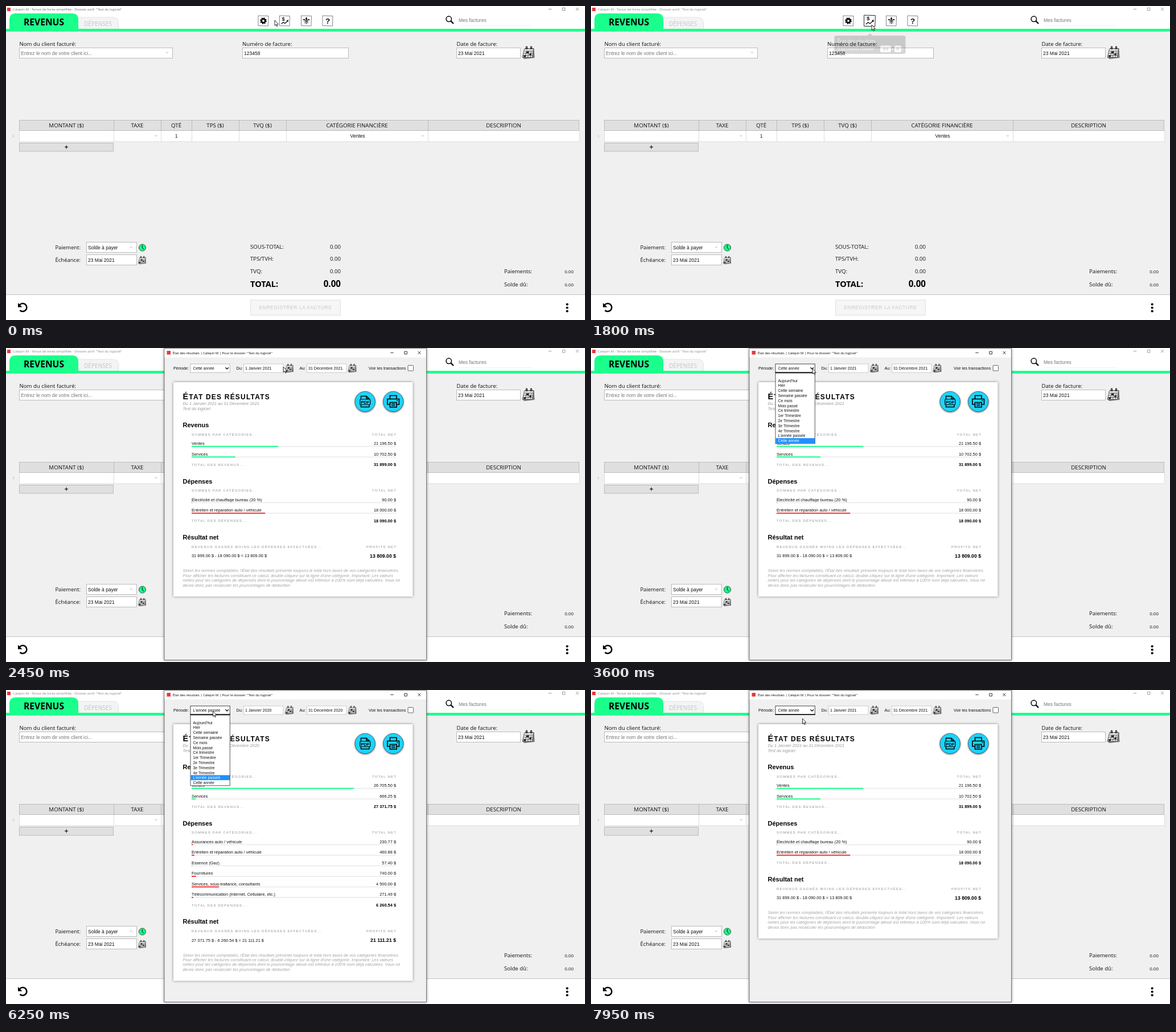
Recreate the animation shown at these times as an HTML page. Size 1017 px wide and 551 px high, loop 8 s.

```html
<!DOCTYPE html>
<html lang="fr">
<head>
<meta charset="utf-8">
<title>État des résultats</title>
<style>
html, body { margin: 0; width: 100%; height: 100%; overflow: hidden; background: #fff; }
svg { display: block; width: 100vw; height: 100vh; font-family: "Liberation Sans", Arial, sans-serif; }
text { white-space: pre; }
.o { font-family: "Open Sans", "Noto Sans", sans-serif; }
.b { font-weight: bold; }
.i { font-style: italic; }
.m { text-anchor: middle; }
.e { text-anchor: end; }
.sp { letter-spacing: 1.23px; }
.line { fill: none; stroke: #000; }
.card { filter: drop-shadow(0 0 2px #0007); }
.round { filter: drop-shadow(0 1px 1.5px #0009); }
</style>
</head>
<body>
<svg viewBox="0 0 1017 551" preserveAspectRatio="none">
  <g id="main"></g><g id="icon"></g><g id="tip"></g><g id="win"></g><g id="cursor"></g>
</svg>
<script>
const LOOP = 8000, GREEN = '#1aff8c', CYAN = '#1cd4fa', LABEL = '#8c8c8c', APP = 'Calepin M';

const rect = (x, y, w, h, fill, stroke = 'none', more = '') =>
  `<rect x="${x}" y="${y}" width="${w}" height="${h}" fill="${fill}" stroke="${stroke}" ${more}/>`;
// y is the middle of the capitals
const text = (s, x, y, size, cls = '', fill = '#111', more = '') =>
  `<text x="${x}" y="${y + size * .355}" font-size="${size}" class="${cls}" fill="${fill}" ${more}>${s}</text>`;
const path = (d, width = 1, more = '') => `<path class="line" d="${d}" stroke-width="${width}" ${more}/>`;
const solid = (d, fill = '#000') => `<path d="${d}" fill="${fill}"/>`;
const circle = (x, y, r, fill = '#000', more = '') => `<circle cx="${x}" cy="${y}" r="${r}" fill="${fill}" ${more}/>`;
const at = (x, y, scale, s) => `<g transform="translate(${x} ${y}) scale(${scale})">${s}</g>`;
const field = (x, y, w, s, fill = '#111') =>
  rect(x + .5, y + .5, w - 1, 18, '#fff', '#bbb') + text(s, x + 3, y + 9.6, 8.5, '', fill);
const caret = (x, y) => solid(`M${x - 3} ${y - 1.5}h6l-3 3.5z`, '#dedede');

const calendar = (x, y, scale) => at(x, y, scale,
  solid('M-6 -8H10L11 9L-7 11L-11 8Z', '#777') +
  solid('M-7 -7H9L7 8H-10Z', '#eee') +
  path('M-7 -7H9L7 8H-10ZM-7.5 -3H8.5M-8.5 1H8M-9 4.5H7.5M-3.5 -3L-5.5 8M.8 -3L-1 8M5 -3L3.5 8', .8, 'style="stroke:#444"') +
  solid('M-3 -2.5h4l-.5 3.5h-4zM2 1.5h3.5l-.5 3h-3.5zM-8 4.5h4l-.5 3h-4z', '#222') +
  path('M-4 -6v-4q1 -2 2 0v4M4 -6v-4q1 -2 2 0v4', 1.1));

const controls = (x, y, gap, color) =>
  path(`M${x - 2.7} ${y}h5.4M${x + gap - 2.2} ${y - 2.2}h4.6v4.6h-4.6zM${x + 2 * gap - 2.5} ${y - 2.5}l5 5m0 -5l-5 5`, .8, `style="stroke:${color}"`);

const toolIcon = (x, scale, glyph, border = '#777') => at(x, 26, scale,
  solid('M-9 -9L9 -8.5L8.5 9L-9 8.5Z', '#fff') +
  path('M-9 -9L9 -8.5L8.5 9L-9 8.5Z', .9, `style="stroke:${border}"`) + glyph);

const gear = circle(0, 0, 3.3, 'none', 'stroke="#000" stroke-width="2.7"') +
  circle(0, 0, 5, 'none', 'stroke="#000" stroke-width="1.8" stroke-dasharray="1.963"');
const trend = text('$', -2.5, -3.5, 8.5, 'b m') + path('M-6 5.5L-2.5 2.5L.5 4.5L5.5 0', 1.1) + solid('M6.7 -1.5L3.2 -1L6 2Z');
const lily = `<text class="m" y="6.3" font-size="17.5" font-family="DejaVu Sans, sans-serif">⚜</text>`;

function mainView(active) {
  const tone = active ? '#707070' : '#868686';
  const cols = [23, 189, 272, 326, 409, 492, 741, 1007];
  const heads = ['MONTANT ($)', 'TAXE', 'QTÉ', 'TPS ($)', 'TVQ ($)', 'CATÉGORIE FINANCIÈRE', 'DESCRIPTION'];
  let s = rect(0, 0, 1017, 551, '#fff') + rect(0, 40, 1017, 466, '#f0f0f0') + rect(0, 40, 1017, 4.7, GREEN);
  s += rect(2, 3, 6, 6, '#e8383c');
  s += text(`${APP} - Tenue de livres simplifiée - Dossier actif: "Test du logiciel"`, 12, 6, 6, 'o', tone);
  s += controls(955.5, 5.5, 24, tone);
  s += solid('M120 40V19.5H188Q198 19.5 198 30V40Z', '#ddd') + solid('M120 40V20.3H188Q197.2 20.3 197.2 30V40Z', '#f4f4f4');
  s += solid('M6 41V24Q6 13 17 13H116Q127 13 127 24V41Z', GREEN);
  s += text('REVENUS', 66.5, 28, 15.6, 'o b m', '#000') + text('DÉPENSES', 161.5, 31.8, 10.1, 'o m', '#c4c4c4');
  s += toolIcon(452, 1, gear) + toolIcon(527.5, 1, lily) + toolIcon(565, 1, text('?', 0, 0, 13.5, 'b m'));
  s += circle(777.8, 22.8, 4.7, 'none', 'stroke="#000" stroke-width="1.5"') + path('M781.3 26.3L786 31', 2.3);
  s += text('Mes factures', 795, 24.5, 8.5, '', '#777') + rect(795, 34, 130, .7, '#eee');

  s += text('Nom du client facturé:', 23.5, 67, 9.65, 'o') + field(23, 73, 270, 'Entrez le nom de votre client ici...', '#777') + caret(283, 82);
  s += text('Numéro de facture:', 415, 67, 9.65, 'o') + field(415, 73, 187, '123458');
  s += text('Date de facture:', 791.5, 67, 9.65, 'o') + field(791, 73, 113, '23 Mai 2021') + calendar(917.5, 82, 1);

  cols.slice(0, 7).forEach((x, k) => {
    const w = cols[k + 1] - x;
    s += rect(x + .5, 218.5, w, 19.5, '#fff', '#ddd') + rect(x + .5, 200.5, w - (k == 6), 18, '#e0e0e0', '#bbb');
    s += text(heads[k], x + w / 2, 210, 9.75, 'o m');
  });
  s += text('1', 13, 228, 6, 'm', '#aaa') + text('1', 299, 228, 8.5, 'm') + text('Ventes', 617.5, 228, 8.5, 'm');
  s += caret(263.5, 228) + caret(732, 228);
  s += rect(23.5, 240.5, 165, 14.5, '#e0e0e0', '#bbb') + path('M103 247.5h6m-3 -3v6', 1.1);

  s += text('Paiement:', 131, 423.5, 9.5, 'o e') + field(141, 414, 89, 'Solde à payer') + caret(220, 423.5);
  s += text('Échéance:', 131, 445.5, 9.5, 'o e') + field(141, 436, 89, '23 Mai 2021') + calendar(239, 446, .65);
  s += circle(239.5, 424, 6, GREEN, 'stroke="#2a5a44"') + path('M239.3 419.5V424.3L242 427', 1);

  ['SOUS-TOTAL:', 'TPS/TVH:', 'TVQ:'].forEach((label, k) => {
    const y = 422.5 + k * 21.5;
    s += text(label, 429, y, 9.7, 'o') + text('0.00', 588, y, 9.6, 'o e');
  });
  s += text('TOTAL:', 429, 488, 14.6, 'o b', '#000') + text('0.00', 588, 487.5, 15.2, 'o b e', '#000');
  s += text('Paiements:', 875, 465.5, 9.5, 'o') + text('0.00', 997, 466, 8, 'o e');
  s += text('Solde dû:', 875, 489, 9.6, 'o') + text('0.00', 997, 489, 8, 'o e');

  s += rect(0, 506, 1017, 1, '#c4c4c4');
  s += path('M24 524.5A7 7 0 1 1 24.5 534', 2.6) + solid('M21 521V528.5H28.5Z');
  s += rect(429.5, 516, 158, 26.5, '#f6f6f6', '#e0e0e0');
  s += text('ENREGISTRER LA FACTURE', 508.5, 529.3, 8.5, 'm', '#c8c8c8', 'letter-spacing=".58"');
  return s + [523.5, 529.5, 535.5].map(y => circle(985.7, y, 2.1)).join('');
}

const tooltip = alpha => `<g opacity="${alpha}">` +
  solid('M485 52.5L490 48L495 52.5Z', '#333') + rect(427.5, 52, 125, 32, '#333', 'none', 'rx="3"') +
  text('État des résultats', 433, 62.3, 8.3, 'o', '#fff') + text('(raccourci clavier', 433, 75, 8.3, 'o', '#fff') +
  rect(508, 69.5, 19, 11.5, '#fff', 'none', 'rx="2"') + text('Alt', 517.5, 75.3, 7.5, 'b m', '#333') +
  text('+', 530, 75, 7.5, 'm', '#fff') +
  rect(533, 69.5, 12, 11.5, '#fff', 'none', 'rx="2"') + text('R', 539, 75.3, 7.5, 'b m', '#333') +
  text(')', 546, 75, 8.3, 'o', '#fff') + '</g>';

const reports = {
  2021: {
    gains: [['Ventes', 21196.5], ['Services', 10702.5]],
    costs: [['Électricité et chauffage bureau (20 %)', 90], ['Entretien et réparation auto / véhicule', 18000]]
  },
  2020: {
    gains: [['Ventes', 26705.5], ['Services', 666.25]],
    costs: [['Assurances auto / véhicule', 230.77], ['Entretien et réparation auto / véhicule', 460.88],
      ['Essence (Gaz)', 57.4], ['Fournitures', 740], ['Services, sous-traitance, consultants', 4500],
      ['Télécommunication (Internet, Cellulaire, etc.)', 271.49]]
  }
};
const note = ["Selon les normes comptables, l'État des résultats présente toujours le total hors taxes de vos catégories financières.",
  "Pour afficher les factures constituant ce calcul, double-cliquez sur la ligne d'une catégorie. Important: Les valeurs",
  'nettes pour les catégories de dépenses dont le pourcentage alloué est inférieur à 100% sont déjà calculées. Vous ne',
  'devez donc pas recalculer les pourcentages de déduction'];
const money = v => v.toFixed(2).replace(/\B(?=(\d{3})+\.)/g, ' ') + ' $';
const sum = rows => rows.reduce((a, r) => a + r[1], 0);

function card(year) {
  const { gains, costs } = reports[year] || { gains: [], costs: [] };
  const all = sum(gains) + sum(costs);
  let y = year ? 135 : 126.5, s = '';
  const heading = (title, sub, right) => {
    s += text(title, 310.5, y, 11, 'b', '#000') + text(sub, 326, y + 16.5, 6, 'sp', LABEL);
    s += text(right, 686.2, y + 16.5, 6, 'sp e', LABEL);
    y += 32.5;
  };
  const section = (title, rows, color) => {
    heading(title, 'SOMMES PAR CATÉGORIES...', 'TOTAL NET');
    if (!year) { y += 39; return; }
    for (const [name, v] of rows) {
      s += text(name, 326, y, 7.4) + text(money(v), 685, y, 7.4, 'e');
      s += rect(326, y + 4.2, 359, 2, '#eee') + rect(326, y + 4.2, 359 * v / all, 2, color);
      y += 18.55;
    }
    s += text(`TOTAL DES ${title.toUpperCase()}...`, 326, y, 6, 'sp', LABEL) + text(money(sum(rows)), 685, y, 7.4, 'b e', '#000');
    y += 29;
  };
  section('Revenus', gains, GREEN);
  section('Dépenses', costs, '#f03c3c');
  heading('Résultat net', 'REVENUS GAGNÉS MOINS LES DÉPENSES EFFECTUÉES...', 'PROFITS NET');
  if (year) {
    const a = sum(gains), b = sum(costs);
    s += text(`${money(a)} - ${money(b)} = ${money(a - b)}`, 326, y, 7.4) + text(money(a - b), 685, y + .4, 8.7, 'b e', '#000');
  }
  y += 26;
  note.forEach((line, k) => s += text(line, 310.5, y + k * 8.4, 7.4, 'i', '#a4a4a4'));

  let top = rect(294, 60, 420.5, y - 14.5, '#fff', 'none', 'class="card"');
  top += text('É<tspan font-size="12">TAT DES RÉSULTATS</tspan>', 310.5, 85.1, 14.4, 'b', '#000', 'letter-spacing="1.2"');
  if (year) {
    top += text(`Du 1 Janvier ${year} au 31 Décembre ${year}`, 310.5, 97.5, 7.35, 'i', '#999');
    top += text('Test du logiciel', 310.5, 106, 7.35, 'i', '#999');
  }
  for (const x of [630.7, 680.3]) top += circle(x, 94, 17.7, CYAN, 'stroke="#345" stroke-width=".7" class="round"');
  top += path('M623.5 90V84.5H633L638 89V90M633 84.5V89H638M623.5 100V103.5H638V100', 1.4);
  top += rect(621.8, 90, 18, 9.5, CYAN, '#000', 'rx="1" stroke-width="1.2"') + text('PDF', 630.8, 94.9, 7.6, 'b m', '#000');
  top += path('M674.5 89V83.5H686V89M674 99H670V89.5H690.5V99H686.5M674.5 95.5H686V104H674.5ZM677 98.3h6.5M677 101.2h6.5', 1.6) + circle(687.3, 92.3, 1);
  return top + s;
}

const periods = ["Aujourd'hui", 'Hier', 'Cette semaine', 'Semaine passée', 'Ce mois', 'Mois passé', 'Ce trimestre',
  '1er Trimestre', '2e Trimestre', '3e Trimestre', '4e Trimestre', "L'année passée", 'Cette année'];
const ROW = 8.8, LIST_TOP = 52.6;

function popup({ year, choice, focus, open, hover }) {
  let s = rect(278, .5, 460.5, 547, '#f0f0f0', '#777', 'class="card"') + rect(278.5, 1, 459.5, 15.5, '#fff');
  s += rect(282.5, 5, 6.5, 6.5, '#e8383c') + controls(678, 8.3, 24, '#000');
  s += text(`État des résultats | ${APP} | Pour le dossier: "Test du logiciel"`, 293, 8.5, 5.85, 'o', '#000');
  s += text('Période:', 294, 35.5, 7.3) + text('Du:', 404.5, 35.5, 7.3) + text('Au:', 515.5, 35.5, 7.3);
  s += text('Voir les transactions', 637, 35.5, 7.3) + rect(706, 30.5, 9.5, 9.5, '#fff', '#666', 'rx="1"');
  s += rect(324, 28, 69.3, 15, '#fff', focus ? '#444' : '#bbb') + path('M385.5 34.2l2.7 2.7l2.7 -2.7', 1.3);
  if (focus) s += rect(323.5, 42.3, 70.3, 1.5, '#000');
  s += rect(417.5, 28, 69.5, 15, '#fff', '#ccc') + rect(528.5, 28, 69.5, 15, '#fff', '#ccc');
  s += calendar(497.5, 35.5, .7) + calendar(608, 35.5, .7);
  if (choice) s += text(periods[choice], 328.5, 35.7, 6.85);
  if (year) s += text(`1 Janvier ${year}`, 420, 35.5, 7.1) + text(`31 Décembre ${year}`, 531, 35.5, 7.1);
  s += card(year);
  if (open) {
    s += rect(324, 44, 69.3, 123.8, '#fff', '#444', 'stroke-width=".9"');
    periods.forEach((p, k) => {
      const y = LIST_TOP + k * ROW;
      if (k == hover) s += rect(324.4, y, 68.6, ROW, '#1e90ff');
      s += text(p, 328.5, y + 4.5, 6.85, '', k == hover ? '#fff' : '#111');
    });
  }
  return s;
}

const clamp = v => Math.max(0, Math.min(1, v));
const smooth = v => v * v * (3 - 2 * v);
const moves = [[0, 472, 25], [50, 472, 25], [600, 493, 32], [850, 493, 33], [2350, 493, 33], [3050, 389, 36],
  [3700, 389, 36], [4350, 344, 161], [4400, 344, 161], [4550, 346, 153], [4600, 346, 152], [5100, 346, 152],
  [5700, 363.5, 37], [6400, 363.5, 37], [6950, 345, 164], [7050, 345, 164], [7200, 345, 161], [7400, 345, 161],
  [7950, 371.5, 50], [8000, 371.5, 50]];
function pointer(t) {
  const k = moves.findIndex(m => m[0] > t), [t0, x0, y0] = moves[k - 1], [t1, x1, y1] = moves[k];
  const u = smooth((t - t0) / (t1 - t0));
  return [x0 + (x1 - x0) * u, y0 + (y1 - y0) * u];
}
const arrow = 'M0 0V9.4L2.1 7.5L3.5 10.7L4.9 10.1L3.5 7H6.4Z';
const hand = 'M-1 1Q0 -.5 1 1V4.5L5 5.5Q6 6 5.7 8L5 12H0L-3 8Q-3 6.5 -1 7.5Z';

const cache = {};
function put(id, s) {
  if (cache[id] !== s) document.getElementById(id).innerHTML = cache[id] = s;
}

function draw(t) {
  const [x, y] = pointer(t);
  const hot = t < 1850 ? smooth(clamp((t - 200) / 200)) : 0;
  put('main', mainView(t < 1800));
  put('icon', toolIcon(489.5, 1 + .1 * hot, trend, hot > .5 ? '#222' : '#777'));

  const shown = smooth(clamp((t - 300) / 800)) * clamp((1840 - t) / 200);
  put('tip', shown ? tooltip(shown) : '');

  let win = '';
  if (t > 1800) {
    const u = clamp((t - 1800) / 200), scale = 1 - .096 * (1 - u) ** 2;
    const past = t >= 4800 && t < 7350;
    const open = t >= 3200 && t < 4800 || t >= 6250 && t < 7350;
    const choice = t < 2000 ? 0 : past ? 11 : 12;
    const year = t < 2000 ? 0 : t >= 4850 && t < 7400 ? 2020 : 2021;
    const hover = y > 44 ? Math.max(0, Math.min(12, Math.floor((y - LIST_TOP) / ROW))) : choice;
    win = `<g opacity="${clamp(u * 1.1)}" transform="translate(508.3 273.8) scale(${scale}) translate(-508.3 -273.8)">` +
      popup({ year, choice, focus: t >= 3200, open, hover }) + '</g>';
  }
  put('win', win);

  const grab = t >= 2000 && x > 489;
  put('cursor', at(x, y, 1, `<path d="${grab ? hand : arrow}" fill="#fff" stroke="#000" stroke-width=".8"/>`));
}

const start = performance.now();
function tick() {
  const t = (performance.now() - start) % LOOP;
  draw(Math.floor(t / 50) * 50);
  requestAnimationFrame(tick);
}
tick();
</script>
</body>
</html>
```
